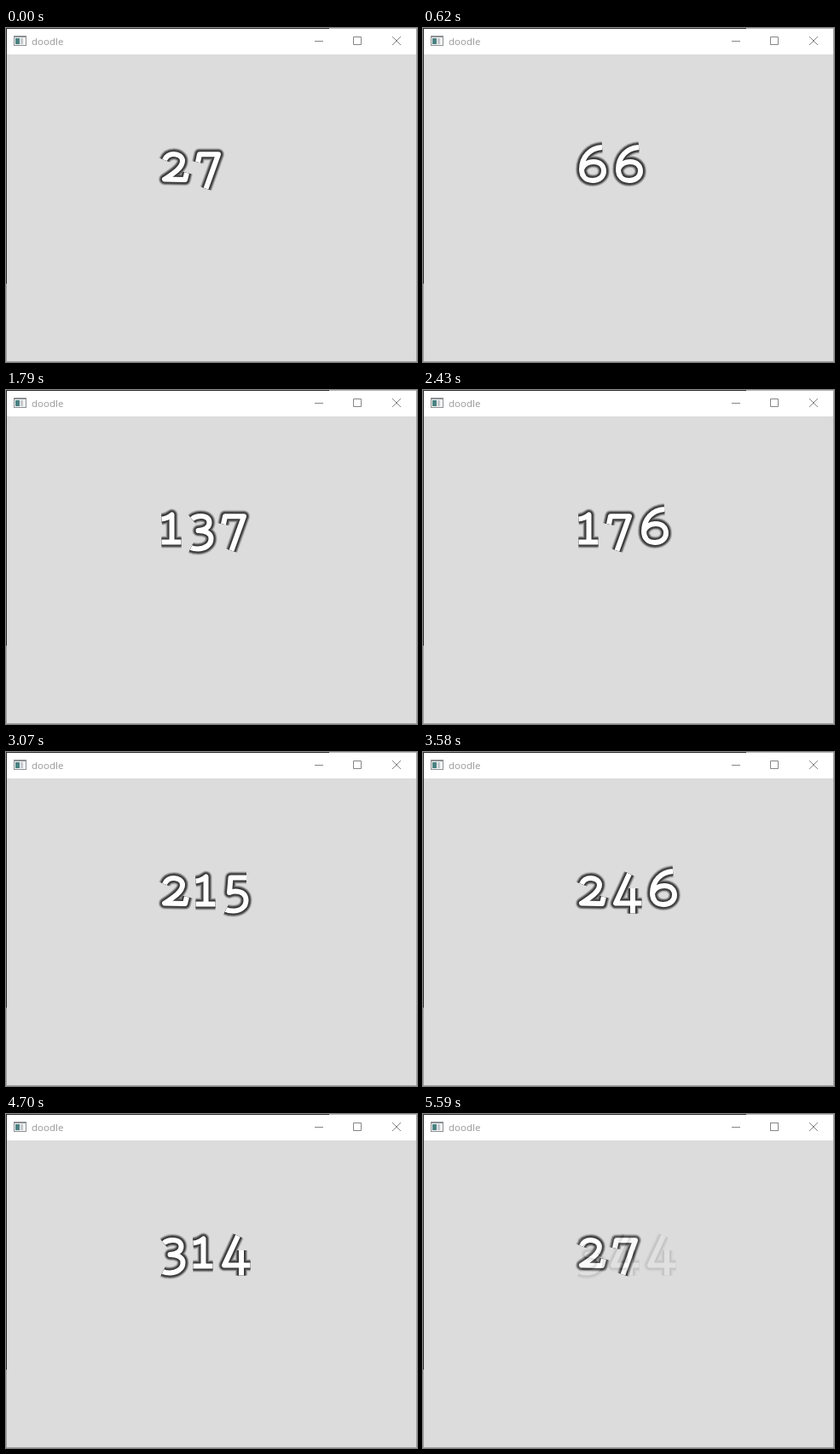
Animation of 482 by 392 pixels, one loop 5660 ms. Source, as an HTML page with a canvas:

```html
<!DOCTYPE html>
<html>
<head>
<meta charset="utf-8">
<style>
html, body { margin: 0; width: 100%; height: 100%; overflow: hidden; background: #dcdcdc; }
canvas { display: block; }
</style>
</head>
<body>
<canvas id="stage" width="482" height="392"></canvas>
<script>
const W = 482, H = 392, LOOP = 5660, FADE_START = 5240, FADE_STEP = 70;
const LAST = 113;  // last counting step before the cross-fade
// Steps that last 30 ms instead of 50 and advance the count by 2 instead of 3.
const SHORT = [0, 2, 7, 12, 18, 23, 28, 34, 39, 44, 49, 54, 60, 65, 70, 75, 81, 86, 92, 97, 103, 108, 112];

// Old-style figures: advance width and centre line
const GLYPHS = [
  [43, 'M18.5 8A12.5 15.5 0 0 1 18.5 39A12.5 15.5 0 0 1 18.5 8Z'],
  [33, 'M2.5 11.5Q9 11 14.5 6.5V38M2.5 38.5H25.5'],
  [40, 'M6 15C8 10 12 8 17 8S27 11 27 16C27 24 16 31 6 37.5L30 38L32 30'],
  [37, 'M5 11.5C8 9 12 8 15.5 8C22 8 25.5 11 25.5 15.5C25.5 21 20 24.5 12.5 25C21 25 27.5 28 27.5 34.5C27.5 42 20 46.5 12 46.5C9 46.5 6 46 4 45'],
  [43, 'M22 3L6 37.5H36.5M26 20V49.5'],
  [37, 'M29 7.5H10.5L9 25C11 24 14 23.5 16 23.5C24 23.5 28.5 27.5 28.5 34C28.5 42 22 46.5 13 46.5C10 46.5 7 46 5 45'],
  [43, 'M30 0C16 1 6 11 6 26C6 34 11 39 19 39C27 39 32 34 32 28C32 21 27 17 20 17C13 17 8 21 6 26'],
  [40, 'M5 17.5L7 8.2H29L14.5 48.5'],
  [43, 'M20 .5A10 9 0 0 1 20 18.5A10 9 0 0 1 20 .5ZM20 19A13 10 0 0 1 20 39A13 10 0 0 1 20 19Z'],
  [42, 'M8 47C22 46 33 36 33 21C33 13 28 8 20 8C12 8 7 13 7 19C7 26 12 30 19 30C26 30 31 26 33 21']
].map(([advance, d]) => ({ advance, path: new Path2D(d) }));

const HALO = [[15, .08], [14, .12], [13, .18], [12, .28], [11, .4], [9.5, .5], [8, .5]];

function rect(g, color, x, y, w, h) {
  g.fillStyle = color;
  g.fillRect(x, y, w, h);
}

function drawWindow(g) {
  rect(g, '#dcdcdc', 0, 0, W, H);
  rect(g, '#fff', 1, 1, W - 2, 30);
  rect(g, '#2b2b2b', 0, 0, 379, 1);
  rect(g, '#b4b4b4', 379, 0, 103, 1);
  rect(g, '#2b2b2b', 0, 0, 1, 300);
  rect(g, '#a0a0a0', 0, 300, 1, 92);
  rect(g, '#a0a0a0', W - 1, 0, 1, H);
  rect(g, '#a0a0a0', 0, H - 1, W, 1);

  rect(g, '#8c9094', 9, 9, 15, 12);
  rect(g, '#f4f4f4', 10, 11, 13, 9);
  rect(g, '#4b8282', 11, 12, 5, 7);
  rect(g, '#c6cbd0', 17, 12, 3, 7);

  g.fillStyle = '#999';
  g.font = '11.5px "Open Sans", "Noto Sans", sans-serif';
  g.fillText('doodle', 30, 20);

  rect(g, '#858585', 362, 15, 10, 1);
  g.strokeStyle = '#858585';
  g.lineWidth = 1;
  g.strokeRect(407.5, 10.5, 9, 9);
  g.stroke(new Path2D('M453 10L463 20M463 10L453 20'));
}

function drawNumber(g, value) {
  const line = new Path2D();
  let x = 180;
  for (const digit of String(value)) {
    const { advance, path } = GLYPHS[digit];
    line.addPath(path, new DOMMatrix([1, 0, 0, 1, x, 140]));
    x += advance;
  }
  g.lineJoin = 'round';
  for (const [width, alpha] of HALO) {
    g.lineWidth = width;
    g.strokeStyle = `rgba(40,40,40,${alpha})`;
    g.stroke(line);
  }
  g.lineWidth = 6;
  g.strokeStyle = '#fff';
  g.stroke(line);
}

function scene(g, value) {
  drawWindow(g);
  drawNumber(g, value);
}

const shortBefore = i => SHORT.filter(s => s < i).length;
const startOf = i => 50 * i - 20 * shortBefore(i);
const valueAt = i => i ? 28 + 3 * i - shortBefore(i) : 27;

const ctx = document.getElementById('stage').getContext('2d');
const first = document.createElement('canvas');
first.width = W;
first.height = H;
scene(first.getContext('2d'), 27);

const origin = performance.now();
function frame() {
  const t = (performance.now() - origin) % LOOP;
  let step = LAST;
  while (startOf(step) > t) step--;
  scene(ctx, valueAt(step));
  if (t >= FADE_START) {
    ctx.globalAlpha = (Math.floor((t - FADE_START) / FADE_STEP) + 1) / 7;
    ctx.drawImage(first, 0, 0);
    ctx.globalAlpha = 1;
  }
  requestAnimationFrame(frame);
}
frame();
</script>
</body>
</html>
```
